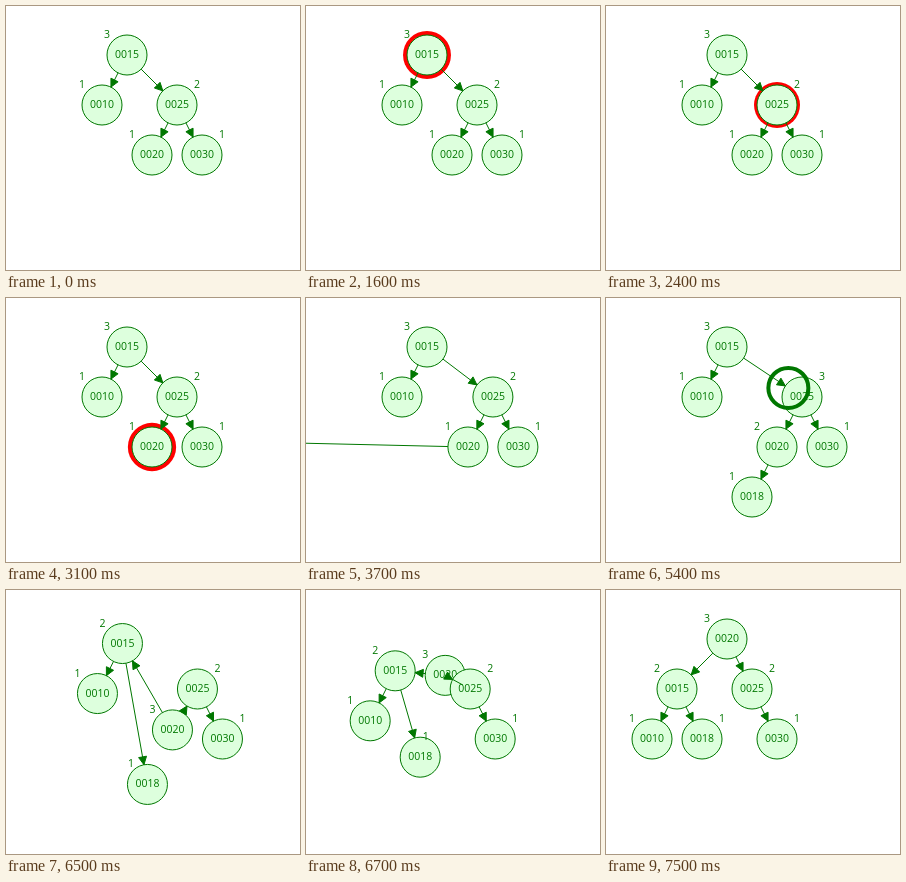
Write an HTML page that moves like this. It is 294 by 264 pixels and loops after 9.6 s.

```html
<!DOCTYPE html>
<html lang="en">
<head>
<meta charset="utf-8">
<title>AVL tree insertion</title>
<style>
  html, body { margin: 0; width: 100%; height: 100%; overflow: hidden; background: #fff; }
  svg { display: block; }
  text { font: 10.5px "Open Sans", "Noto Sans", sans-serif; text-anchor: middle; }
</style>
</head>
<body>
<svg id="stage" width="294" height="264" viewBox="0 0 294 264"></svg>
<script>
const LOOP = 9600, TICK = 100;
const START = 1589.6, BLOCK = 374.2, BLOCK_FRAMES = 22;
const PULSE = BLOCK / BLOCK_FRAMES * 8, PULSE_ORIGIN = 2400;
const ROOT_X = 121, ROOT_Y = 49, GAP = 50, RADIUS = 20;
const GREEN = '#007700', RED = '#ff0000', FILL = '#ddffdd';

const stage = document.getElementById('stage');
const clamp = v => Math.min(1, Math.max(0, v));
const mix = (a, b, k) => a + (b - a) * k;
const num = v => v.toFixed(2);

function insert(node, key) {
  if (!node) return { key };
  const branch = key < node.key ? 'left' : 'right';
  node[branch] = insert(node[branch], key);
  return node;
}

// Subtree widths and heights, bottom up.
function measure(node) {
  if (!node) return { width: GAP / 2, height: 0 };
  const left = measure(node.left), right = measure(node.right);
  node.leftWidth = left.width;
  node.rightWidth = right.width;
  node.height = 1 + Math.max(left.height, right.height);
  return { width: left.width + right.width, height: node.height };
}

function buildTree(keys) {
  const root = keys.reduce(insert, null);
  const nodes = {}, edges = [];
  measure(root);
  (function place(node, x, y, side) {
    nodes[node.key] = { x, y, side, height: node.height };
    const { left, right } = node;
    if (left) {
      edges.push([node.key, left.key]);
      place(left, x - left.rightWidth, y + GAP, -1);
    }
    if (right) {
      edges.push([node.key, right.key]);
      place(right, x + right.leftWidth, y + GAP, 1);
    }
  })(root, ROOT_X, ROOT_Y, -1);
  return { root, nodes, edges };
}

const startKeys = [15, 10, 25, 20, 30], newKey = 18;
const before = buildTree(startKeys);
const inserted = buildTree([...startKeys, newKey]);
const rotated = buildTree([20, 15, 25, 10, 18, 30]);
before.nodes[newKey] = { x: ROOT_X - 470, y: ROOT_Y, side: -1, height: 1 };

const path = [];
for (let node = before.root; node; node = newKey < node.key ? node.left : node.right) {
  path.push(node.key);
}

// Every step lasts one block: search down, move in, climb back up, rotate.
const MOVE_IN = 2 * path.length - 1;
const RED_EDGES = MOVE_IN + 2 * path.length + 1;
const ROTATE = RED_EDGES + 1;
const visits = {}, hops = {}, heightSteps = {};
path.forEach((key, i) => {
  visits[2 * i] = key;
  if (i) hops[2 * i - 1] = [path[i - 1], key];
  const climb = RED_EDGES - 2 * (i + 1);
  hops[climb] = [path[i + 1] ?? newKey, key];
  heightSteps[key] = climb + 1;
});
const isHeavyEdge = (a, b) => a === path[path.indexOf(b) - 1];

function layout(step) {
  const [from, to, k] = step < ROTATE
    ? [before.nodes, inserted.nodes, clamp(step - MOVE_IN)]
    : [inserted.nodes, rotated.nodes, clamp(step - ROTATE)];
  const nodes = {};
  for (const key in from) {
    const a = from[key], b = to[key];
    nodes[key] = { x: mix(a.x, b.x, k), y: mix(a.y, b.y, k), side: mix(a.side, b.side, k) };
  }
  return nodes;
}

function heightOf(key, step) {
  const tree = step >= ROTATE ? rotated : step >= heightSteps[key] ? inserted : before;
  return tree.nodes[key].height;
}

const circle = (x, y, r, style) =>
  `<circle cx="${num(x)}" cy="${num(y)}" r="${num(r)}" ${style}/>`;

const label = (x, y, content, color = GREEN) =>
  `<text x="${num(x)}" y="${num(y + 3)}" fill="${color}">${content}</text>`;

function arrow(a, b, color) {
  const d = Math.hypot(b.x - a.x, b.y - a.y);
  const ux = (b.x - a.x) / d, uy = (b.y - a.y) / d;
  const tipX = b.x - ux * RADIUS, tipY = b.y - uy * RADIUS;
  const corner = side =>
    `${num(tipX - ux * 8 - uy * 4 * side)} ${num(tipY - uy * 8 + ux * 4 * side)}`;
  const tip = `${num(tipX)} ${num(tipY)}`;
  return `<path d="M${num(a.x + ux * RADIUS)} ${num(a.y + uy * RADIUS)}L${tip}` +
    `M${corner(1)}L${tip}L${corner(-1)}Z" fill="${color}" stroke="${color}"/>`;
}

function render(time) {
  const step = Math.floor((time - START) / BLOCK * BLOCK_FRAMES) / BLOCK_FRAMES;
  const phase = Math.floor(step);
  const nodes = layout(step);
  const { edges } = step >= ROTATE ? rotated : step >= MOVE_IN ? inserted : before;
  const out = [];

  for (const key in nodes) {
    const { x, y, side } = nodes[key];
    if (visits[phase] === +key) {
      const turn = Math.abs((time - PULSE_ORIGIN) / PULSE % 1);
      const wave = 1 - Math.abs(1 - 2 * turn);
      out.push(circle(x, y, RADIUS + 3 + 4 * wave, `fill="${RED}"`));
    }
    out.push(circle(x, y, RADIUS, `fill="${FILL}" stroke="${GREEN}"`));
    out.push(label(x, y, key.padStart(4, '0')));
    const color = heightSteps[key] === phase ? RED : GREEN;
    out.push(label(x + side * RADIUS, y - RADIUS, heightOf(key, step), color));
  }

  if (hops[phase]) {
    const [a, b] = hops[phase].map(key => nodes[key]);
    const k = step - phase;
    out.push(circle(mix(a.x, b.x, k), mix(a.y, b.y, k), RADIUS,
      `fill="none" stroke="${GREEN}" stroke-width="4"`));
  }

  for (const [a, b] of edges) {
    const hot = phase === RED_EDGES && isHeavyEdge(a, b);
    out.push(arrow(nodes[a], nodes[b], hot ? RED : GREEN));
  }
  stage.innerHTML = out.join('');
}

const origin = performance.now();
let shown = -1;
function frame() {
  const elapsed = (performance.now() - origin) % LOOP;
  const time = Math.floor(elapsed / TICK) * TICK;
  if (time !== shown) render(shown = time);
  requestAnimationFrame(frame);
}
frame();
</script>
</body>
</html>
```
